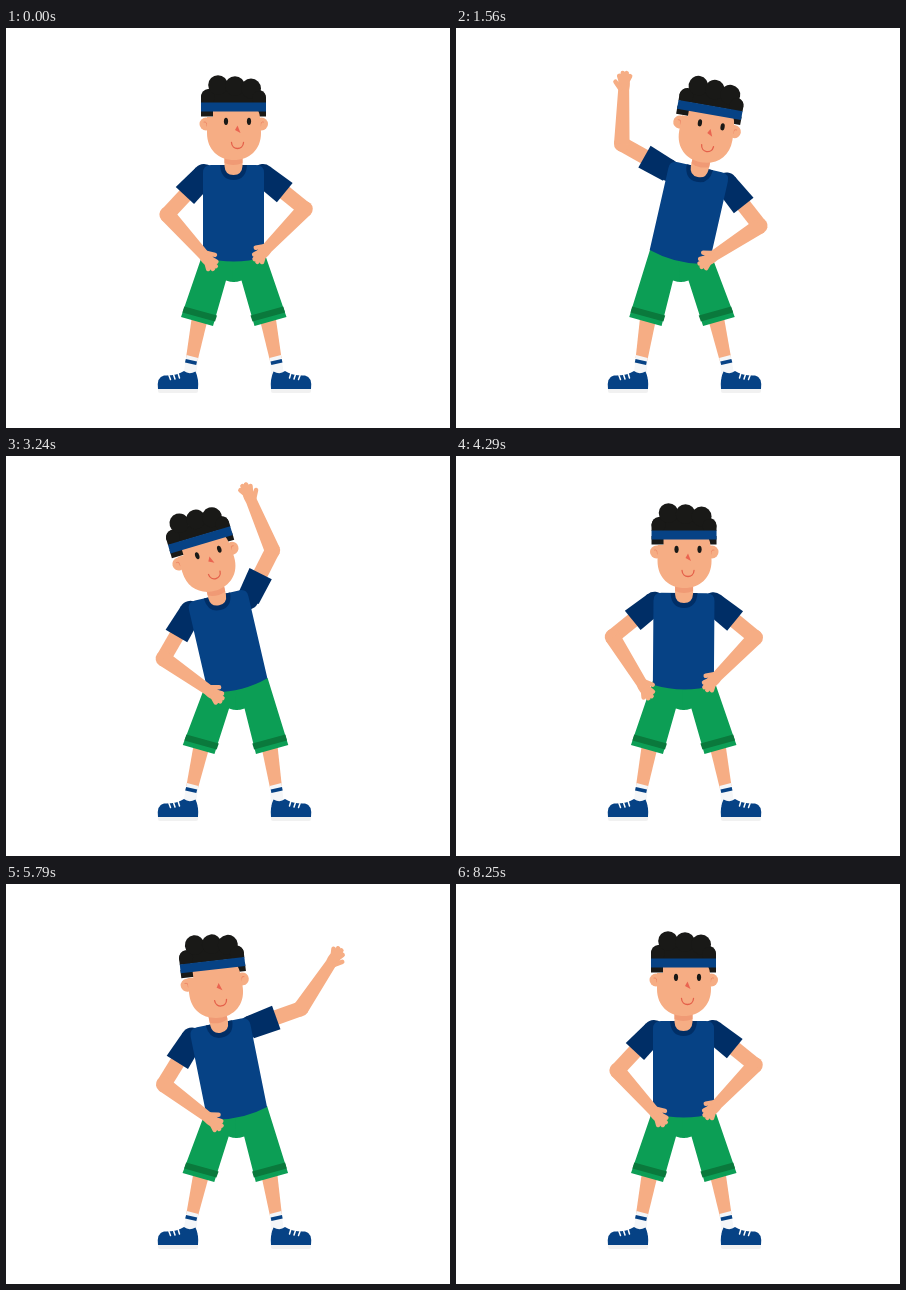
Animation of 444 by 400 pixels, one loop 8430 ms. Source, as an HTML page:

```html
<!DOCTYPE html>
<html lang="en">
<head>
<meta charset="utf-8">
<title>Side stretch</title>
<style>
  html, body { margin: 0; width: 100%; height: 100%; overflow: hidden; background: #fff; }
  svg { display: block; width: 100vw; height: 100vh; }
  .skin { fill: #f6ad84; }
  .shirt { fill: #064285; }
  .navy { fill: #002e66; }
  .hair { fill: #191917; }
  .shorts { fill: #0c9e55; }
  .hem { fill: #0a793c; }
  .line { fill: none; stroke-linecap: round; stroke-linejoin: round; }
</style>
</head>
<body>
<svg viewBox="0 0 444 400" xmlns="http://www.w3.org/2000/svg">
  <defs>
    <g id="leg">
      <path class="skin" d="M186 288L202 290L191.5 333L180 330Z"/>
      <path fill="#f4f6f8" d="M180.5 327L192 330L190 350H177Z"/>
      <path class="shirt" d="M179.8 331L191 333.500L190.2 337L179 334.500Z"/>
    </g>
    <g id="shoe">
      <path fill="#f1f1f1" d="M152 360H192V363Q192 365 190 365H154Q152 365 152 363Z"/>
      <path class="shirt" d="M152 361Q150.500 349 158 347.500Q170 348 178 343Q183 347 189.500 343.500Q193 351 192 361Z"/>
      <path class="line" stroke="#fff" stroke-width="1.500" d="M163 347.500L164.500 351.500M167.500 346.500L169 351M172 345L173.500 350"/>
    </g>
    <g id="shortsLeg">
      <path class="shorts" d="M198 222L175 289L207 298L220 252.500Q224 254 229 254V222Z"/>
      <path class="hem" d="M178.300 278.500L211 287.500L209 293.500L176.400 284.500Z"/>
    </g>
    <g id="upperArm">
      <path class="skin" d="M0 -7.500H54V7.500H0Z"/>
      <circle class="navy" r="11"/>
      <path class="navy" d="M0 -11L28 -12.500V12.500L0 12Z"/>
    </g>
    <g id="forearm">
      <circle class="skin" r="7.800"/>
      <path class="skin" d="M0 -7.800L54 -5.500Q63 -7 66 -4V4Q61 7 54 5.500L0 7.800Z"/>
      <path class="line" stroke="#f6ad84" stroke-width="4.500"
            d="M62 -3L68 -6M63 -1L71 -2.500M63 1L71 1.500M62 3L68 5M55 3.500L62 8.500"/>
    </g>
  </defs>

  <g id="legs">
    <use href="#leg"/>
    <use href="#leg" transform="matrix(-1 0 0 1 455.500 0)"/>
    <use href="#shortsLeg"/>
    <use href="#shortsLeg" transform="matrix(-1 0 0 1 455.500 0)"/>
  </g>
  <use href="#shoe"/>
  <use href="#shoe" transform="matrix(-1 0 0 1 457 0)"/>

  <g id="body">
    <use id="upperR" href="#upperArm"/>
    <g transform="matrix(-1 0 0 1 455 0)"><use id="upperL" href="#upperArm"/></g>
    <path class="shirt" d="M197 145Q197 137 205 137H250Q258 137 258 145V229Q228 238 197 229Z"/>
    <path class="navy" d="M214 137H241Q240 152 227.500 152Q215 152 214 137Z"/>
    <path class="skin" d="M218.500 126H236.500V138Q236 147 227.500 147Q219 147 218.500 138Z"/>
    <path fill="#f09a75" d="M218.500 128H236.500V135Q227 139 218.500 135Z"/>
    <g id="head">
      <circle class="skin" cx="200" cy="96" r="6.500"/>
      <circle class="skin" cx="255.500" cy="96" r="6.500"/>
      <path class="line" stroke="#ee8a68" d="M198 94Q201 93 201 98M257.500 94Q254.500 93 254.500 98"/>
      <path class="hair" d="M195 80H260V88.500H195Z"/>
      <path class="skin" d="M207 82H252Q255 88 255 105C255 122 243 132 228 132C213 132 201 122 201 105V89H207Z"/>
      <path class="hair" d="M195 75V68Q196 62 202 61L254 62Q260 64 260 70V75Z"/>
      <g class="hair">
        <circle cx="202" cy="69" r="7"/>
        <circle cx="212" cy="57" r="9.800"/>
        <circle cx="229" cy="58" r="9.800"/>
        <circle cx="245" cy="60.500" r="10"/>
        <circle cx="253" cy="70" r="7"/>
      </g>
      <rect class="shirt" x="195" y="74.500" width="65" height="9"/>
      <g id="eyes" class="hair">
        <ellipse cx="220" cy="93.300" rx="2.100" ry="3.600"/>
        <ellipse cx="243" cy="93.300" rx="2.100" ry="3.600"/>
      </g>
      <path fill="#ea6450" d="M231.500 97.500L229 102L234.500 105Z"/>
      <path class="line" stroke="#e4604a" stroke-width="1.300" d="M225.500 114.500C226 122.500 237 122.500 237.500 114.500"/>
    </g>
    <use id="foreR" href="#forearm"/>
    <g transform="matrix(-1 0 0 1 455 0)"><use id="foreL" href="#forearm"/></g>
  </g>
</svg>
<script>
const LOOP = 8430, STEP = 30;
const SHOULDER = { x: 257, y: 147 }, UPPER = 54;
const LEAN = 13, HEAD_TILT = 16.5;
const RAISED = { upper: -50, fore: -100 };
const SIDES = {
  R: { dir: -1, upper: 39, fore: 134, foreDelay: 30 },
  L: { dir: 1, upper: 47, fore: 132, foreDelay: 84 }
};
// side, start of the raise, start of the return
const STRETCHES = [
  ['R', 60, 645], ['L', 1260, 2050], ['R', 2720, 3560],
  ['L', 4200, 4880], ['R', 5530, 6320], ['L', 6920, 7650]
];

const el = id => document.getElementById(id);
const place = (id, value) => el(id).setAttribute('transform', value);
const mix = (a, b, p) => a + (b - a) * p;

function ease(t, from, length) {
  const x = Math.min(1, Math.max(0, (t - from) / length));
  return (1 - Math.cos(Math.PI * x)) / 2;
}

const pulse = (t, up, upLength, down, downLength) =>
  ease(t, up, upLength) - ease(t, down, downLength);

function drawArm(name, upperAmount, foreAmount) {
  const side = SIDES[name];
  const upper = mix(side.upper, RAISED.upper, upperAmount);
  const fore = mix(side.fore, RAISED.fore, foreAmount);
  const rad = upper * Math.PI / 180;
  const x = SHOULDER.x + UPPER * Math.cos(rad);
  const y = SHOULDER.y + UPPER * Math.sin(rad);
  place('upper' + name, `translate(${SHOULDER.x} ${SHOULDER.y}) rotate(${upper})`);
  place('fore' + name, `translate(${x} ${y}) rotate(${fore})`);
}

function draw(t) {
  const arms = { R: [0, 0], L: [0, 0] };
  let lean = 0, tilt = 0;
  for (const [name, start, back] of STRETCHES) {
    const { dir, foreDelay } = SIDES[name];
    lean += dir * LEAN * pulse(t, start + 60, 260, back, 330);
    tilt += dir * HEAD_TILT * pulse(t, start + 130, 300, back + 200, 360);
    arms[name][0] += pulse(t, start, 500, back, 560);
    arms[name][1] += pulse(t, start + 50, 310, back + foreDelay, 520);
  }
  const shift = -0.3 * lean;
  const skew = -shift / 112;
  place('legs', `matrix(1 0 ${skew} 1 ${-skew * 340} 0)`);
  place('body', `translate(${shift} 0) rotate(${lean} 228 228)`);
  place('head', `rotate(${tilt - lean} 228 139)`);
  for (const name in arms) drawArm(name, ...arms[name]);
  el('eyes').style.display = t >= 5730 && t < 5850 ? 'none' : '';
}

const origin = performance.now();
function tick() {
  const t = (performance.now() - origin) % LOOP;
  draw(Math.floor(t / STEP) * STEP);
  requestAnimationFrame(tick);
}
draw(0);
requestAnimationFrame(tick);
</script>
</body>
</html>
```
